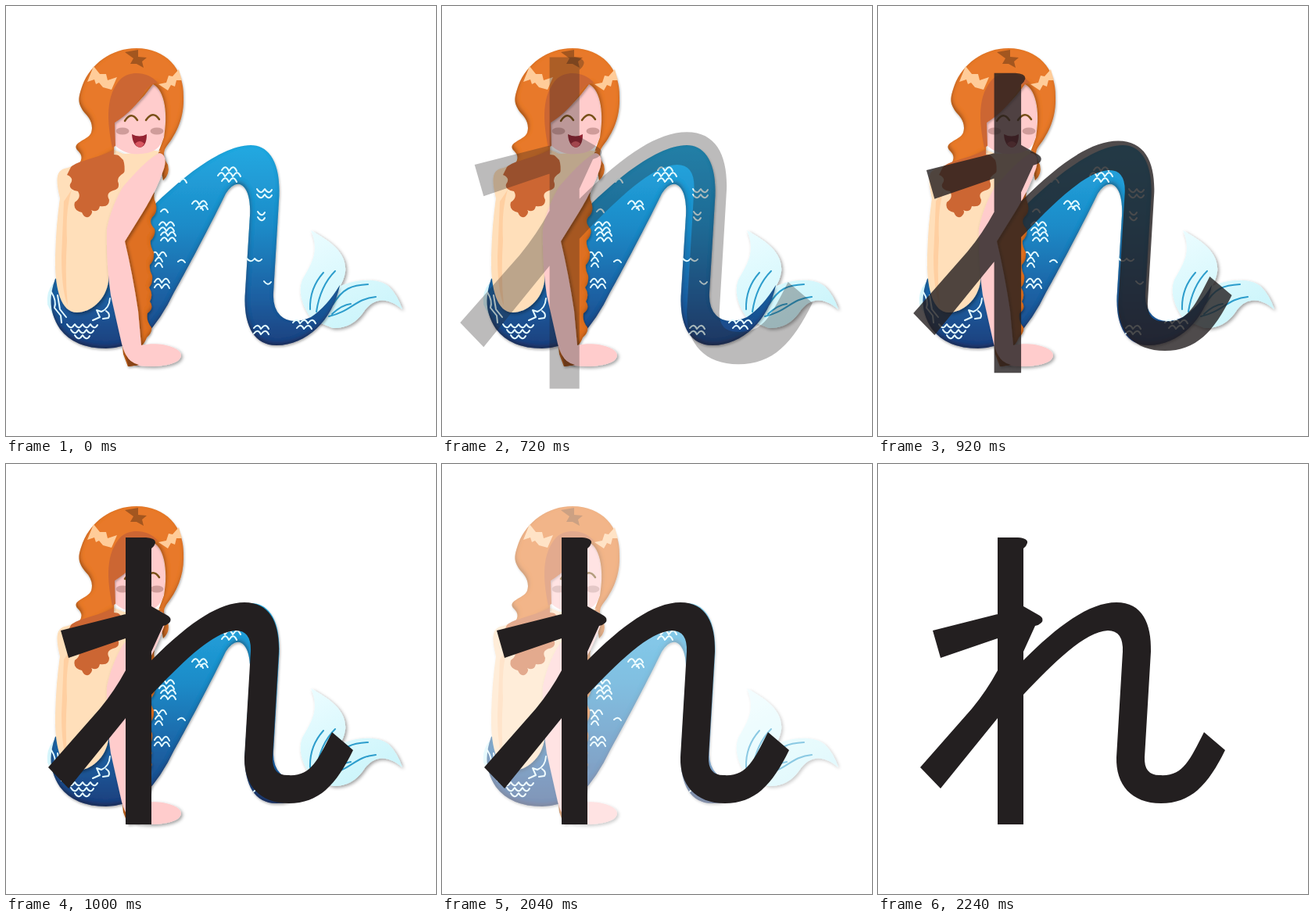
Recreate the animation shown at these times as an HTML page. Size 550 by 550 pixels, loop 3 s.

```html
<!DOCTYPE html>
<html lang="ja">
<head>
<meta charset="utf-8">
<title>Mermaid kana</title>
<style>
  html, body { margin: 0; width: 100%; height: 100%; overflow: hidden; background: #fff; }
  svg { display: block; width: 100vw; height: 100vh; }
  .line { fill: none; stroke-linecap: round; stroke-linejoin: round; }
</style>
</head>
<body>
<svg viewBox="0 0 550 550">
  <defs>
    <linearGradient id="water" gradientUnits="userSpaceOnUse" x1="0" y1="178" x2="0" y2="436">
      <stop offset="0" stop-color="#24a9e1"/>
      <stop offset=".4" stop-color="#1c8bc8"/>
      <stop offset=".75" stop-color="#1a60a2"/>
      <stop offset="1" stop-color="#1a3f7d"/>
    </linearGradient>
    <linearGradient id="fin" gradientUnits="userSpaceOnUse" x1="385" y1="300" x2="440" y2="410">
      <stop offset="0" stop-color="#e9fcff"/>
      <stop offset="1" stop-color="#cdf5fb"/>
    </linearGradient>
    <filter id="soft" x="-10%" y="-10%" width="125%" height="125%">
      <feDropShadow dx="2" dy="2" stdDeviation="2" flood-opacity=".38"/>
    </filter>
    <filter id="bevel" x="-10%" y="-10%" width="125%" height="125%">
      <feOffset in="SourceAlpha" dx="1" dy="-3"/>
      <feGaussianBlur stdDeviation="2.5" result="inner"/>
      <feFlood flood-color="#201008" flood-opacity=".6"/>
      <feComposite in2="inner" operator="out"/>
      <feComposite in2="SourceAlpha" operator="in" result="edge"/>
      <feMerge result="shaded"><feMergeNode in="SourceGraphic"/><feMergeNode in="edge"/></feMerge>
      <feDropShadow in="shaded" dx="1" dy="2" stdDeviation="1.5" flood-opacity=".3"/>
    </filter>
  </defs>

  <g id="mermaid">
    <!-- fins -->
    <g filter="url(#soft)" fill="url(#fin)">
      <path d="M390 287C408 297 437 313 434 340Q432 352 426 360L396 407Q370 375 379 350C390 330 402 315 390 287Z"/>
      <path d="M426 359C445 350 475 346 490 359Q501 370 507 388C488 372 470 372 457 392Q442 413 418 412L398 404Z"/>
    </g>
    <path class="line" stroke="#2d9dcc" stroke-width="2" d="M406 341Q388 361 389 388M421 339Q402 358 397 391M463 356C442 357 431 361 418 382M473 372C447 374 441 391 413 397M441 381Q430 382 417 394"/>

    <!-- tail -->
    <path fill="#d6f6fc" d="M61 354Q51 365 53 382L67 408 76 390Z"/>
    <path filter="url(#bevel)" fill="url(#water)" d="M63 349C55 372 55 392 69 413Q88 438 128 438 153 437 176 424 199 400 215 366C239 323 266 271 281 240Q290 226 299 228C310 232 313 250 312 268L306 365C303 405 315 434 346 434 384 434 418 402 427 357Q410 385 390 398 365 409 351 396 341 386 342 367L349 250C353 198 335 178 313 178 280 178 233 212 190 254L130 310Z"/>
    <path id="scales" class="line" stroke="#e4fbff" stroke-width="2"/>
    <path class="line" stroke="#e4fbff" stroke-width="2" d="M58 366Q65 377 62 386L70 396 71 405M66 370L69 388 77 398M133 374Q132 387 122 391L116 389 120 398 111 402M128 390Q134 394 131 399L124 400"/>

    <!-- hair below the arm -->
    <path filter="url(#bevel)" fill="#df7020" d="M190 238Q188 245 191 251 195 263 187 270 182 277 190 285 192 293 185 300 184 307 189 315 190 325 184 331 183 338 187 345 188 354 183 360 189 369 184 378 190 386 181 393 179 403 186 411 187 418 180 424 177 432 172 436L171 459 156 461 150 445 138 305Z"/>

    <!-- back and face -->
    <path filter="url(#soft)" fill="#ffdfba" d="M136 183L79 207C62 209 64 224 69 246Q64 280 63 320C62 358 69 392 91 392 108 392 128 376 131 352L132 300Q140 250 200 190C193 180 178 188 150 189Z"/>
    <path fill="#ffcfa1" d="M84 235Q76 260 78 300 75 345 79 383 71 364 71 320L74 250Z"/>
    <path fill="#fcc" d="M188 98C201 106 206 130 203 160Q201 180 187 186C172 193 148 190 138 176L137 145Z"/>

    <!-- hair -->
    <path filter="url(#bevel)" fill="#e8792b" d="M167 54C134 54 108 75 98 101 92 118 91 124 101 137Q113 149 109 162C105 172 84 174 91 184Q101 193 93 202L83 215 115 200 138 187 139 149Q168 128 188 100C204 108 207 140 202 168L195 187 201 223Q210 215 207 203 198 190 205 180C219 162 228 142 227 116 228 80 204 54 167 54Z"/>
    <path fill="#c63" d="M136 181C129 147 127 114 147 93 159 82 183 84 194 98Q185 99 178 108 164 134 139 149L140 179Z"/>
    <path fill="#c63" d="M138 184C119 194 91 198 83 206L78 216Q88 220 82 228 80 235 92 237 97 245 88 251 85 261 97 264 101 273 107 269 112 264 109 261 118 265 120 256 132 258 132 248 127 239 137 236 147 234 143 224 143 218 150 214 158 206 151 197 147 190 138 190Z"/>
    <g fill="#fc9">
      <path d="M112 77L120 87 128 87 130 95 142 91 135 107 124 104 119 98 115 100 113 94 104 97Z"/>
      <path d="M221 81L213 90 208 89 205 98 195 100 207 108 211 101 216 103 218 95 225 95Z"/>
    </g>
    <path fill="#a3561f" d="M152 59L169 56 169 65 180 66 174 71 176 79 167 74 159 74 163 67Z"/>

    <!-- features -->
    <g fill="#cf9c9a"><ellipse cx="149" cy="160" rx="8.5" ry="4.5"/><ellipse cx="193" cy="160" rx="8.5" ry="4.5"/></g>
    <path class="line" stroke="#785018" stroke-width="2.5" d="M152 147Q160 134 168 146M179 146Q188 133 196 145"/>
    <path fill="#942331" d="M161 164Q171 169 180 164 180 180 171 181 162 179 161 164Z"/>
    <path fill="#d85761" d="M165 176Q171 170 177 176 174 181 171 181 167 180 165 176Z"/>

    <!-- arm -->
    <path filter="url(#soft)" fill="#fcc" d="M196 188C204 189 205 198 202 208Q193 235 175 264L152 301Q162 343 169 390L173 434C195 429 224 436 224 447 223 459 195 463 170 460Q154 456 148 432L134 370Q128 330 129 285C135 254 152 219 177 200Z"/>
    <path fill="#ffdfba" d="M143 190Q174 191 198 185 180 198 166 213L145 236Q155 212 150 197Z"/>
    <path fill="#8a4316" d="M153 446Q158 456 170 459L157 461Z"/>
  </g>

  <path id="kana" fill="#231f20" d="M153 94H179Q192 95 191 101 190 105 186 108V461H153Z
    M70 213L153 192 186 182 207 194Q213 198 209 203 206 206 201 207L186 240 165 260 153 223 80 248Z
    M54 388L120 313Q139 290 153 264L186 251C230 207 270 177 305 177 338 177 350 204 349 240L341 375Q340 398 360 398C390 400 398 380 417 343L444 366C422 411 400 434 362 434 324 434 304 410 305 375L313 240Q314 213 294 213C265 214 225 254 186 295L153 325 80 415Z"/>
</svg>
<script>
const $ = id => document.getElementById(id);
const LOOP = 3000, STEP = 40, CENTER = [252, 278];

// A cluster is stacked rows of small arcs, each row centred on x.
function cluster(x, y, bend, ...rows) {
  return rows.map((count, row) => Array.from({ length: count }, (_, i) => {
    const left = x + (i - count / 2) * 10;
    const top = y + row * 7;
    return `M${left} ${top}q5 ${bend} 9 1`;
  }).join('')).join('');
}

$('scales').setAttribute('d', [
  cluster(286, 210, -8, 2, 3, 2),
  cluster(248, 253, -8, 2, 1),
  cluster(254, 259, -8, 1),
  cluster(227, 225, -8, 1),
  cluster(203, 263, -7, 1),
  cluster(206, 280, -8, 2, 2),
  cluster(208, 293, -8, 2, 2),
  cluster(196, 319, -9, 2, 1, 1),
  cluster(200, 353, -9, 2, 2),
  cluster(225, 327, -5, 1),
  cluster(331, 234, 8, 2, 2),
  cluster(327, 263, 8, 1, 1),
  cluster(318, 323, 6, 2),
  cluster(335, 352, 7, 1),
  cluster(327, 412, -7, 2, 2),
  cluster(382, 405, -7, 3, 2),
  cluster(98, 407, 8, 4, 3, 2)
].join(''));

// Progress in 40 ms steps, the first one taken at the start time.
const progress = (time, start, steps) =>
  Math.max(0, Math.min(1, (Math.floor((time - start) / STEP) + 1) / steps));

function draw(now) {
  const time = now % LOOP;
  const arrive = progress(time, 640, 10);
  const leave = progress(time, 1920, 9);
  const scale = 1 + (1 - arrive) * 2 / 9;
  const [x, y] = CENTER;
  $('kana').setAttribute('opacity', arrive);
  $('kana').setAttribute('transform', `translate(${x} ${y}) scale(${scale}) translate(${-x} ${-y})`);
  $('mermaid').setAttribute('opacity', 1 - leave);
}

const start = performance.now();
function tick() {
  draw(performance.now() - start);
  requestAnimationFrame(tick);
}
tick();
</script>
</body>
</html>
```
